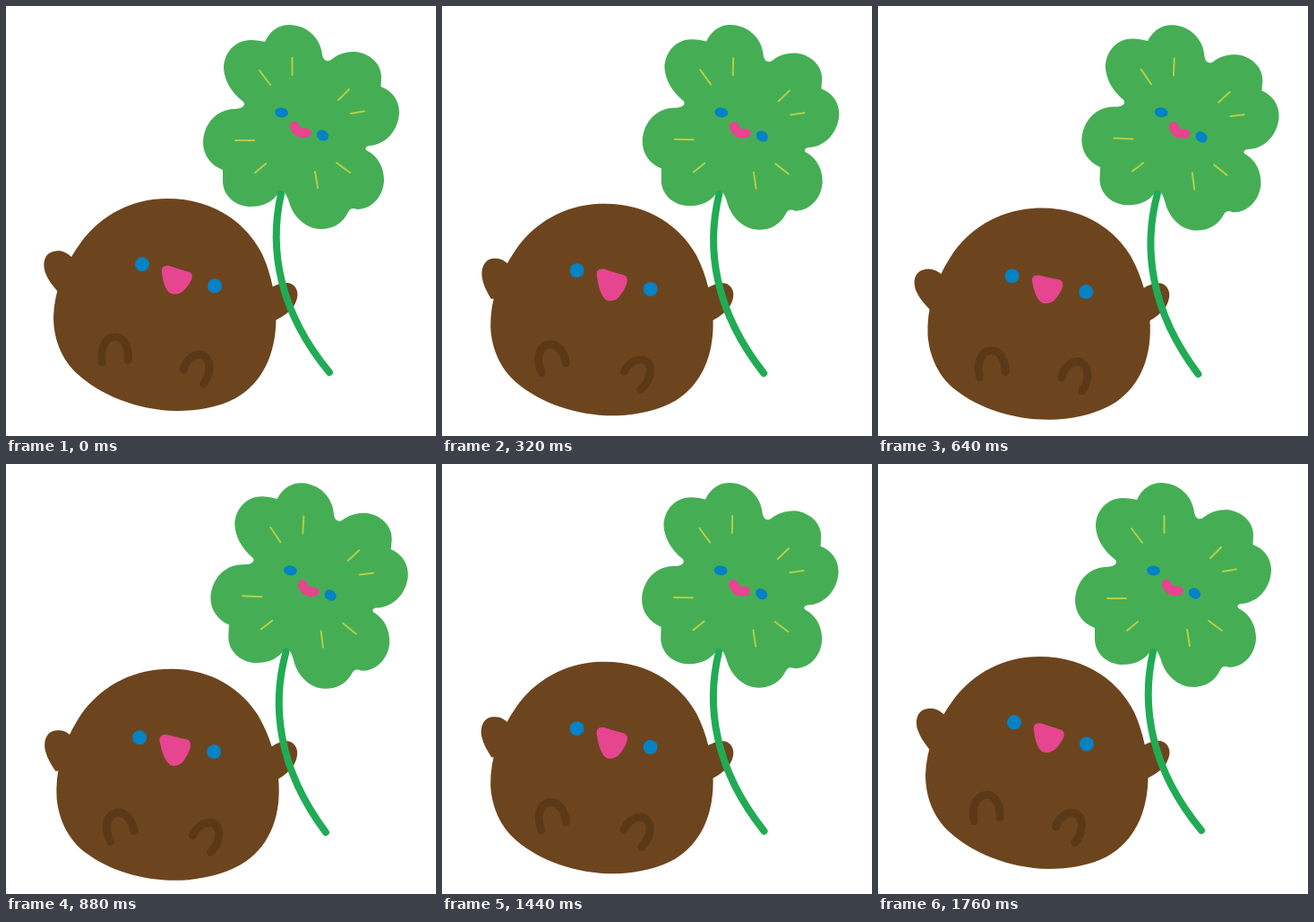
An HTML page that plays this animation: 480x480 px, repeating every 1.82 s.

```html
<!DOCTYPE html>
<html lang="en">
<head>
<meta charset="utf-8">
<title>Clover wave</title>
<style>
  html, body { margin: 0; width: 100%; height: 100%; overflow: hidden; background: #fff; }
  svg { display: block; width: 100%; height: 100%; }
  .line { fill: none; stroke-linecap: round; }
</style>
</head>
<body>
<svg viewBox="0 0 480 480">
  <g id="body" fill="#6c451e">
    <path id="arm" d="M74 281C67 274 60 272 53 274C43 276 40 287 44 298C47 306 52 312 58 319L82 312Z"/>
    <path d="M290 318C299 312 306 309 313 309C322 309 327 317 325 326C322 339 311 346 298 352Z"/>
    <path d="M180 215C235 215 270 245 286 277C297 301 301.500 328 301.500 348C301.500 390 285 422 256 438C237 448 214 452 190 452C146 451 105 434 80 411C61 394 53 370 53 347C54 318 65 288 85 262C107 233 141 215 180 215Z"/>
    <g class="line" stroke="#5b3917" stroke-width="9">
      <path id="leftFoot" d="M107 398C105 382 111 369.500 122 369.500C132 369.500 138 382 136 395"/>
      <path id="rightFoot" d="M198 406C201 395 209 389 217 389C228 391 231 407 220.500 422"/>
    </g>
    <g fill="#0582c4">
      <circle cx="152" cy="288.300" r="8"/>
      <circle cx="233" cy="312.500" r="8"/>
    </g>
    <path id="mouth" fill="#e6458f" d="M182 290C176 289 173 292 174 297C175 308 178 317 183 320.500C188 323 194 321.500 198 318C202 314 206 309 207.500 304C208.500 300 207 297.500 203 296.500C196 294.500 188 292 182 290Z"/>
  </g>
  <g id="clover">
    <path fill="#45ae55" d="M289 40C295 27 305 21 316 21C335 21 351 35 353 54C354 61 359 63 363 60C370 54 379 51 389 51C405 52 419 64 419 79L418.500 90C432 95 439 106 439 119C438 139 424 155 405 156C401 157 400 160 404 162C415 168 422 180 422 195C421 213 408 227 392 227C387 225 384 226 382 230C376 243 364 249 352 249C335 249 322 236 317 222C314 212 311 207 308 207C305 207 303 211 300 214C293 221 283 224 272 224C254 223 241 210 242 193L242 183C229 178 220 167 220 152C221 131 235 116 254 115C264 115 268 111 265 107C252 97 244 84 243 70C243 52 256 38 273 38C280 38 285 39 289 40Z"/>
    <path class="line" stroke="#b5cf45" stroke-width="2" d="M283 72L295 88M319.500 58V77M383 93L371 105M385 120L400 117.500M256 150H277M290 176L278 186M345 185L348 203M369 175L384 186"/>
    <path class="line" stroke="#21ab55" stroke-width="8" d="M307 210C293.500 270 304 340 361 409"/>
    <g fill="#0582c4">
      <ellipse cx="307.500" cy="119" rx="7.500" ry="5.500" transform="rotate(5 307.500 119)"/>
      <ellipse cx="353.500" cy="144.500" rx="7" ry="5.700" transform="rotate(35 353.500 144.500)"/>
    </g>
    <path class="line" stroke="#e6458f" stroke-width="10.500" d="M322 134Q325 143.500 335.500 141.500"/>
  </g>
</svg>
<script>
  const LOOP = 1820, STEP = 80, HALF = 11;
  const HAND = [316, 325];
  const part = id => document.getElementById(id);
  const turn = (id, angle, [x, y]) =>
    part(id).setAttribute('transform', `rotate(${angle} ${x} ${y})`);
  const triangle = phase => 1 - Math.abs(1 - 2 * (phase % 1));

  function pose(step) {
    const rise = 1 - Math.abs(step - HALF) / HALF;
    const sink = rise * (1.2 - 0.2 * rise);
    // The clover leans out faster than it comes back.
    const lean = step < HALF ? Math.min(1, step * 0.11) : rise;
    const wave = triangle(step * STEP * 3 / LOOP);

    turn('body', -5.9 * sink, HAND);
    turn('clover', 2.75 * lean, HAND);
    turn('arm', 14 * wave, [70, 304]);
    turn('leftFoot', -14 * wave, [119, 396]);
    turn('rightFoot', 15 * wave, [211, 412]);
    part('mouth').setAttribute('transform',
      `translate(0 306) scale(1 ${1 + 0.14 * wave}) translate(0 -306)`);
  }

  const start = performance.now();
  function tick() {
    const time = (performance.now() - start) % LOOP;
    pose(Math.floor(time / STEP));
    requestAnimationFrame(tick);
  }
  tick();
</script>
</body>
</html>
```
